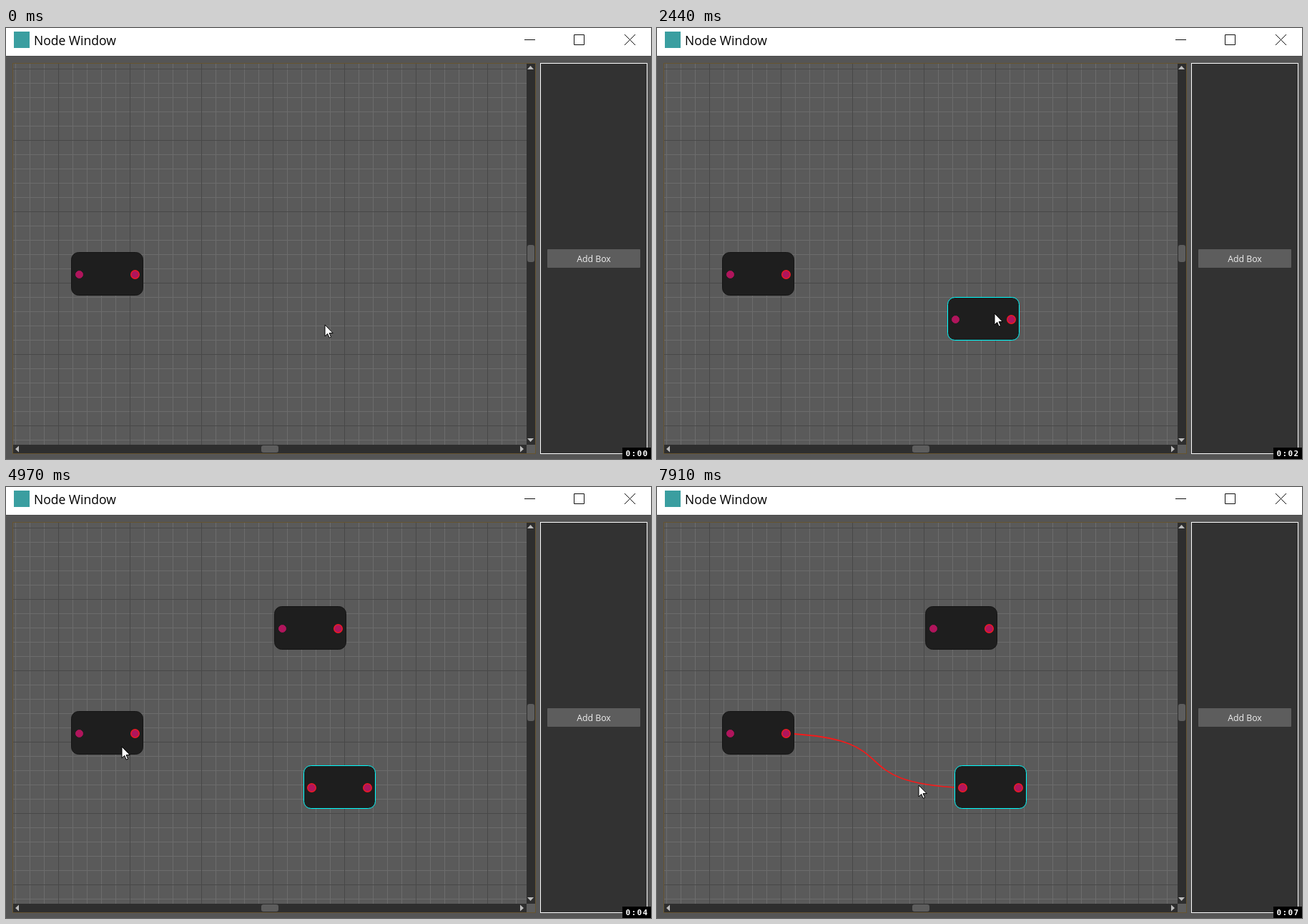
Recreate the animation shown at these times as an HTML page. Size 902 by 604 pixels, loop 8000 ms.

```html
<!DOCTYPE html>
<html lang="en">
<head>
<meta charset="utf-8">
<title>Node Window</title>
<style>
  html, body { margin: 0; width: 100%; height: 100%; overflow: hidden; background: #555; }
  svg { display: block; width: 902px; height: 604px; }
  .ui { font-family: "Open Sans", "Noto Sans", sans-serif; }
  .clock { font: bold 11px "DejaVu Sans Mono", monospace; letter-spacing: 1.4px; fill: #fff; }
  .body { fill: #1e1e1e; stroke: #141414; }
  .selected .body { stroke: #0ff; }
  .port { fill: #b0155c; stroke: #b0155c; stroke-width: 1; }
  .ring { stroke: #f01c22; stroke-width: 1.4; }
  .hot { fill: #b172bd; stroke: #c9a0d0; }
</style>
</head>
<body>
<svg viewBox="0 0 902 604">
  <defs>
    <pattern id="minor" x="13" y="57" width="20" height="20" patternUnits="userSpaceOnUse">
      <path d="M.5 0V20M0 .5H20" stroke="#6c6c6c"/>
    </pattern>
    <pattern id="major" x="73" y="57" width="100" height="100" patternUnits="userSpaceOnUse">
      <path d="M.5 0V100M0 .5H100" stroke="#484848"/>
    </pattern>
    <clipPath id="view"><path d="M10 50H728V584H10Z"/></clipPath>
  </defs>

  <rect width="902" height="604" fill="#555"/>
  <rect width="902" height="39" fill="#fff"/>
  <path d="M0 39.5H902" stroke="#4a4a4a"/>
  <rect x="11" y="5" width="22" height="23" fill="#3a9ea0"/>
  <text class="ui" x="39" y="24" font-size="17.5">Node Window</text>
  <path d="M725 16.5H740M794.5 9.5H808.5V23.5H794.5ZM865 9L880 24M880 9L865 24" fill="none" stroke="#111"/>

  <rect x="9.5" y="49.5" width="731" height="547" fill="#2e2e2e" stroke="#66542f"/>
  <rect x="10" y="50" width="718" height="534" fill="#5a5a5a"/>
  <rect x="10" y="50" width="718" height="534" fill="url(#minor)"/>
  <rect x="10" y="50" width="718" height="534" fill="url(#major)"/>
  <g fill="#5d5d5d">
    <rect x="729" y="304" width="10" height="24" rx="3"/>
    <rect x="357" y="585" width="24" height="10" rx="3"/>
    <rect x="728" y="584" width="12" height="12"/>
  </g>
  <path d="M729 58L733.5 53L738 58ZM729 575L733.5 580L738 575ZM18 585.5L13 590L18 594.5ZM719 585.5L724 590L719 594.5Z" fill="#bbb"/>

  <rect x="747.5" y="49.5" width="149" height="547" fill="#323232" stroke="#fff"/>
  <rect id="button" x="757" y="310" width="130" height="26" rx="1"/>
  <text class="ui" x="822" y="328" font-size="12.3" fill="#eee" text-anchor="middle">Add Box</text>

  <g clip-path="url(#view)">
    <path id="wire" fill="none" stroke="#f51a1a" stroke-width="1.8"/>
    <g id="nodes"></g>
    <circle id="grip" r="9" fill="none" stroke="#fff" stroke-width="1.4"/>
  </g>
  <path id="cursor" d="M0 0V16L3.7 12.4L6.2 18.2L8.6 17.2L6.1 11.6H11.2Z" fill="#fff" stroke="#000"/>
  <rect x="862" y="588" width="40" height="16" fill="#000"/>
  <text id="clock" class="clock" x="866.5" y="600"></text>
</svg>
<script>
const LOOP = 8000;
const NS = "http://www.w3.org/2000/svg";
const $ = id => document.getElementById(id);

// Turning points of the pointer: [time, x, y]
const STOPS = [
  [0, 446, 416], [360, 375, 397], [810, 740, 328], [1080, 820, 320], [1260, 820, 320],
  [1980, 439, 380], [2300, 439, 380], [2440, 472, 400], [2710, 441, 190], [2780, 441, 190],
  [2950, 676, 256], [3130, 810, 322], [3320, 808, 322], [3830, 482, 378], [4040, 442, 384],
  [4400, 485, 417], [4550, 485, 417], [4970, 162, 364], [5250, 180, 346], [5400, 180, 346],
  [6140, 421, 422], [6600, 424, 423], [7120, 427, 423], [7910, 366, 418]
];
const PRESSES = [1080, 3180], PRESS_TIME = 160;
const WIRE = { from: 5400, to: 7120, x0: 180.5, y0: 345.5, x1: 427.5, y1: 421.5 };

const clamp = (v, lo, hi) => Math.min(hi, Math.max(lo, v));
const within = (t, from, to) => t >= from && t < to;
const show = (el, on) => el.setAttribute("visibility", on ? "visible" : "hidden");

// Slope of the segment that starts at stop i, along one axis
function slope(i, axis) {
  const p = STOPS[i], q = STOPS[i + 1];
  return p && q ? (q[axis] - p[axis]) / (q[0] - p[0]) : 0;
}

// Zero where the motion turns or rests, so the spline never overshoots
function tangent(i, axis) {
  const a = slope(i - 1, axis), b = slope(i, axis);
  return a * b > 0 ? 2 * a * b / (a + b) : 0;
}

function pointer(t) {
  const i = clamp(STOPS.findIndex(s => s[0] > t) - 1, -1, STOPS.length);
  if (i < 0) return STOPS[STOPS.length - 1].slice(1);
  const p = STOPS[i], q = STOPS[i + 1], span = q[0] - p[0], u = (t - p[0]) / span;
  return [1, 2].map(k => {
    const ease = u * u * (3 - 2 * u);
    const out = u * (1 - u) ** 2 * span * tangent(i, k);
    const into = u * u * (u - 1) * span * tangent(i + 1, k);
    return p[k] + (q[k] - p[k]) * ease + out + into;
  });
}

function add(parent, tag, attrs) {
  const el = document.createElementNS(NS, tag);
  for (const key in attrs) el.setAttribute(key, attrs[key]);
  return parent.appendChild(el);
}

function makeNode(motion) {
  const g = add($("nodes"), "g", {});
  add(g, "rect", { x: .5, y: .5, width: 100, height: 60, rx: 10, class: "body" });
  const input = add(g, "circle", { cx: 11.5, cy: 31.5 });
  const output = add(g, "circle", { cx: 89.5, cy: 31.5 });
  return { g, input, output, ...motion };
}

function setPort(el, ring, hot) {
  el.setAttribute("class", "port" + (ring ? " ring" : "") + (hot ? " hot" : ""));
  el.setAttribute("r", ring ? 5.8 : 5);
}

function place(el, x, y) {
  el.setAttribute("transform", `translate(${x.toFixed(2)} ${y.toFixed(2)})`);
}

// A node follows the pointer between grab and drop, held at (dx, dy)
function drawNode(node, t) {
  const [x, y] = pointer(clamp(t, node.grab, node.drop));
  place(node.g, x - node.dx, y - node.dy);
  show(node.g, t >= node.born);
  node.g.setAttribute("class", within(t, node.grab, node.until) ? "selected" : "");
}

function wirePath(x0, y0, x1, y1) {
  const dx = (x1 - x0) * .7, dy = (y1 - y0) * .1;
  return `M${x0} ${y0}C${x0 + dx} ${y0 + dy} ${x1 - dx} ${y1 - dy} ${x1} ${y1}`;
}

const first = makeNode();
const a = makeNode({ born: 1260, grab: 2300, drop: 2710, until: 4040, dx: 66, dy: 23 });
const b = makeNode({ born: 3320, grab: 4040, drop: 4400, until: LOOP, dx: 69, dy: 27 });
place(first.g, 91, 314);

function draw(t) {
  const [x, y] = pointer(t);
  const near = (px, py) => Math.hypot(x - px, y - py) < 8;
  place($("cursor"), x, y);

  const pressed = PRESSES.some(p => within(t, p, p + PRESS_TIME));
  const over = within(x, 757, 887) && within(y, 310, 336);
  $("button").setAttribute("fill", pressed ? "#2b2b2b" : over ? "#707070" : "#5d5d5d");

  drawNode(a, t);
  drawNode(b, t);

  const linking = within(t, WIRE.from, WIRE.to);
  setPort(first.input, false);
  setPort(first.output, true, near(WIRE.x0, WIRE.y0));
  setPort(a.input, false);
  setPort(a.output, t >= 1980);
  setPort(b.input, t >= b.grab, linking && near(WIRE.x1, WIRE.y1));
  setPort(b.output, t >= b.grab);

  const end = linking ? [x - 1, y - 1.5] : [WIRE.x1, WIRE.y1];
  $("wire").setAttribute("d", wirePath(WIRE.x0, WIRE.y0, ...end));
  show($("wire"), t >= WIRE.from);
  show($("grip"), linking && x > 360);
  place($("grip"), x + 1, y + 1);

  $("clock").textContent = "0:0" + Math.floor((t + 80) / 1068);
}

const start = performance.now();
function tick(now) {
  draw(Math.max(0, now - start) % LOOP);
  requestAnimationFrame(tick);
}
draw(0);
requestAnimationFrame(tick);
</script>
</body>
</html>
```
